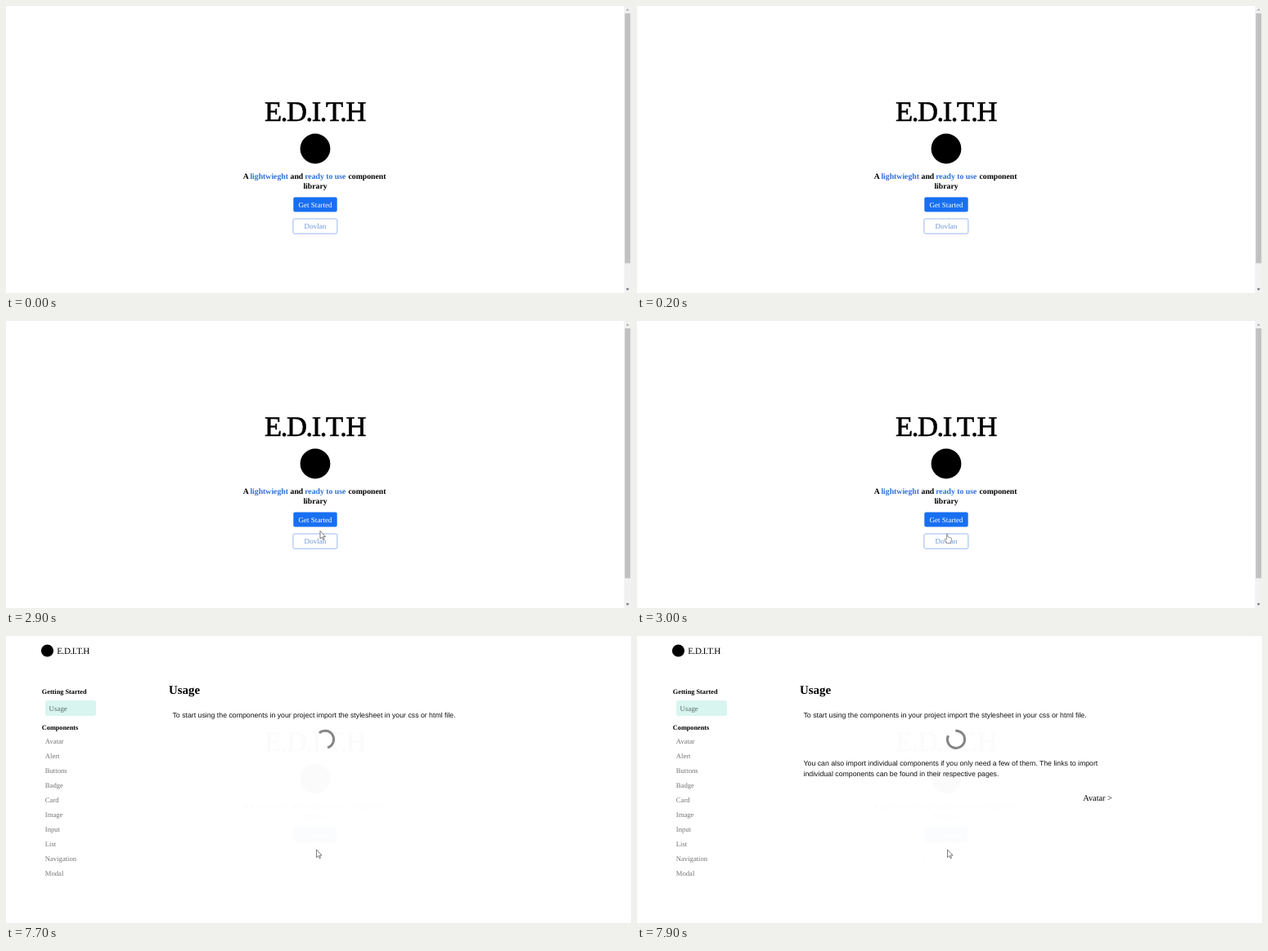
Animation, 764 px wide and 352 px high, one loop 8 s. Source, as an HTML page:

```html
<!DOCTYPE html>
<html lang="en">
<head>
<meta charset="utf-8">
<title>Component library</title>
<style>
  html, body { margin: 0; width: 100%; height: 100%; overflow: hidden; background: #fff; }
  svg { display: block; width: 100vw; height: 100vh; }
  text { font-family: "Liberation Serif", serif; text-rendering: geometricPrecision; white-space: pre; }
  .mid { text-anchor: middle; }
  .bold { font-weight: 700; }
  .brand { letter-spacing: -.041em; }
  .tag { font-size: 9.75px; font-weight: 700; }
  .blue { fill: #2f6fdc; }
  .btn { font-size: 9.1px; }
  .head { font-size: 8.25px; font-weight: 700; }
  .item { font-size: 8.65px; fill: #747474; }
  .body { font: 8.74px "Liberation Sans", sans-serif; fill: #111; }
</style>
</head>
<body>
<svg viewBox="0 0 764 352" preserveAspectRatio="none">
  <g id="home">
    <text class="brand" x="316" y="141" font-size="34.6" stroke="#000" stroke-width=".6">E.D.I.T.H</text>
    <circle cx="378" cy="175" r="18.4"/>
    <text class="tag" x="289.7" y="212">A</text>
    <text class="tag blue" x="298.4" y="212">lightwieght</text>
    <text class="tag" x="347.5" y="212">and</text>
    <text class="tag blue" x="365.2" y="212">ready to use</text>
    <text class="tag" x="418.5" y="212">component</text>
    <text class="tag mid" x="378" y="224">library</text>
    <rect x="351.3" y="234.6" width="53.4" height="17.8" rx="2" fill="#186ff2"/>
    <text class="btn mid" x="378" y="247" fill="#fff">Get Started</text>
    <rect x="350.9" y="261" width="54" height="18.2" rx="1.8" fill="#fff" stroke="#8fb2ee" stroke-width=".9"/>
    <text class="btn mid" x="378" y="273.2" fill="#6a94de">Dovlan</text>
    <rect x="755.5" width="8.5" height="352" fill="#f1f1f1"/>
    <rect x="756.5" y="9" width="6.7" height="306.5" fill="#c1c1c1"/>
    <path d="M757.8 5.5h4l-2-2.2z" fill="#a3a3a3"/>
    <path d="M757.8 346.5h4l-2 2.2z" fill="#505050"/>
  </g>

  <g id="docs">
    <circle cx="50.5" cy="18" r="7.6"/>
    <text class="brand" x="62.3" y="21.8" font-size="11.1">E.D.I.T.H</text>
    <text class="head" x="43.8" y="71">Getting Started</text>
    <rect x="48" y="79" width="62" height="19" rx="3" fill="#d8f5ef"/>
    <text class="item" x="52.6" y="92" style="font-size:8.9px;fill:#5c6a67">Usage</text>
    <text class="head" x="43.8" y="114.7">Components</text>
    <g id="menu"></g>
    <text class="bold" x="199" y="71" font-size="14.9">Usage</text>
    <text class="body" x="203.5" y="100.3">To start using the components in your project import the stylesheet in your css or html file.</text>
    <path id="spin" fill="none" stroke="#858585" stroke-width="3"/>
    <g id="more">
      <text class="body" x="203.5" y="159">You can also import individual components if you only need a few of them. The links to import</text>
      <text class="body" x="203.5" y="172">individual components can be found in their respective pages.</text>
      <text x="545.3" y="202" font-size="10.3">Avatar &gt;</text>
    </g>
  </g>

  <path id="arrow" d="M0 0V9.6L2.2 7.6L3.7 10.8L5.1 10.2L3.7 7.1H6.6Z" fill="#fff" stroke="#444" stroke-width=".7"/>
  <path id="hand" d="M2.6 7.4V1.2Q2.6 .3 3.3 .3T4.1 1.2V4.4L7.5 5Q8.8 5.3 8.7 6.6L8.2 9.2L7.4 11.8H3.4L.5 8Q.1 7.1 .8 6.8T2.6 7.4Z" fill="#fff" stroke="#707070" stroke-width=".75"/>
</svg>
<script>
const LOOP = 8000;
const $ = id => document.getElementById(id);
const show = (id, on) => { $(id).style.display = on ? '' : 'none'; };

// start time, cursor, x, y
const moves = [
  [0, '', 0, 0],
  [2700, 'arrow', 397, 240],
  [2800, 'arrow', 391, 249],
  [2900, 'arrow', 384, 257.5],
  [3000, 'hand', 375.8, 260.6],
  [7700, 'arrow', 379.5, 262]
];
// start time, first angle, sweep in degrees
const spins = [[7700, -132, 205], [7800, -110, 252], [7900, -94, 300]];

const at = (steps, t) => steps.filter(s => s[0] <= t).pop() || steps[0];

const items = 'Avatar Alert Buttons Badge Card Image Input List Navigation Modal'.split(' ');
$('menu').innerHTML = items.map((name, i) =>
  `<text class="item" x="47.8" y="${132.4 + i * 17.9}">${name}</text>`).join('');

function arc(cx, cy, r, start, sweep) {
  const point = deg => {
    const a = deg * Math.PI / 180;
    return `${cx + r * Math.cos(a)} ${cy + r * Math.sin(a)}`;
  };
  return `M${point(start)}A${r} ${r} 0 ${sweep > 180 ? 1 : 0} 1 ${point(start + sweep)}`;
}

function draw(t) {
  const docs = t >= 7700;
  show('docs', docs);
  show('more', t >= 7900);
  // the landing page lingers as a faint trace
  $('home').style.opacity = docs ? .01 : 1;

  const [, cursor, x, y] = at(moves, t);
  for (const id of ['arrow', 'hand']) {
    show(id, id === cursor);
    $(id).setAttribute('transform', `translate(${x} ${y})`);
  }

  const [, start, sweep] = at(spins, t);
  $('spin').setAttribute('d', arc(390, 126.8, 10.6, start, sweep));
}

const begin = performance.now();
function tick() {
  draw((performance.now() - begin) % LOOP);
  requestAnimationFrame(tick);
}
tick();
</script>
</body>
</html>
```
